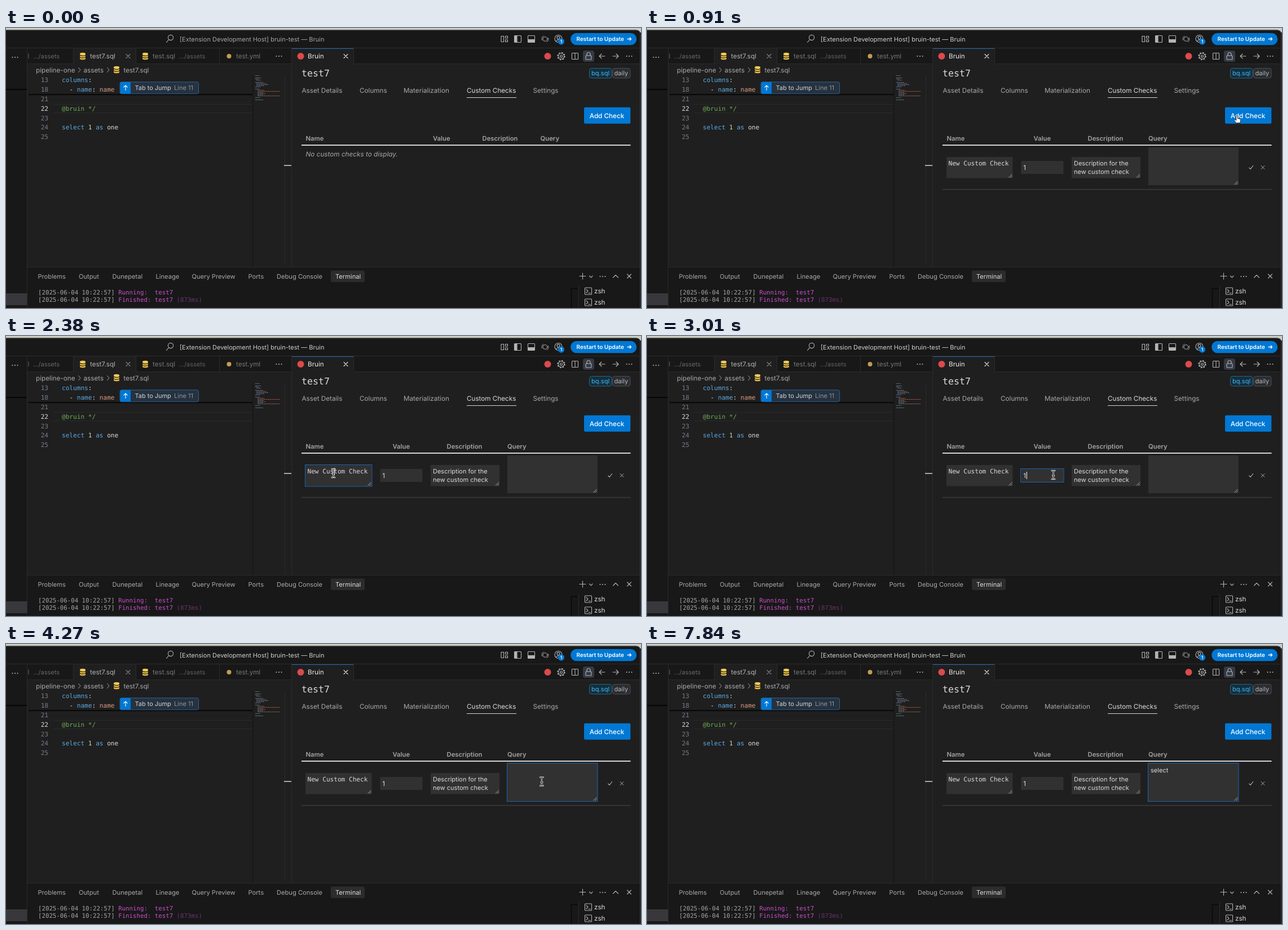
Recreate the animation shown at these times as an HTML page. Size 1126x497 px, loop 8000 ms.

```html
<!DOCTYPE html>
<html lang="en">
<head>
<meta charset="utf-8">
<title>Custom checks</title>
<style>
html, body { margin: 0; width: 100%; height: 100%; overflow: hidden; background: #181818; }
svg { display: block; width: 100vw; height: 100vh; }
text { font: 11.7px Inter, sans-serif; fill: #a9a9a9; white-space: pre; text-rendering: geometricPrecision; }
.mono text, text.mono { font: 11.1px "DejaVu Sans Mono", monospace; fill: #dadada; }
.num text { fill: #757c85; text-anchor: end; }
.term text { font-size: 10.74px; fill: #a6a6a6; }
.panel text { font-size: 11.15px; }
.head text { font-size: 11.3px; font-weight: 600; fill: #a4a4a4; }
.small { font-size: 11px; }
.icon { fill: none; stroke: #b4b4b4; stroke-width: 1.1; stroke-linecap: round; stroke-linejoin: round; }
.field { fill: #313131; }
.focus { fill: none; stroke: #1d62b4; }
.caret { fill: #f0f0f0; }
.key { fill: #5ba9e2; }
.light { fill: #dcdcdc !important; }
#title { font-size: 11.02px; }
</style>
</head>
<body>
<svg viewBox="0 0 1126 497" preserveAspectRatio="none">
  <defs>
    <g id="db">
      <path d="M-5 -4.200V4.200A5 2.100 0 0 0 5 4.200V-4.200Z" fill="#e8bd45"/>
      <ellipse cy="-4.200" rx="5" ry="2.100" fill="#f2cc58"/>
      <path d="M-5 -2.600A5 2.100 0 0 0 5 -2.600M-5 1.100A5 2.100 0 0 0 5 1.100" fill="none" stroke="#1f1f1f" stroke-width="1.200"/>
    </g>
    <g id="dots" fill="#b8b8b8"><circle cx="-4.500" r="1"/><circle r="1"/><circle cx="4.500" r="1"/></g>
    <path id="cross" d="M-3.500 -3.500L3.500 3.500M3.500 -3.500L-3.500 3.500"/>
    <path id="grip" d="M-6 0L0 -6M-2.800 0L0 -2.800" fill="none" stroke="#b5b5b5" stroke-width=".9"/>
    <g id="shell" class="icon"><rect x="-6" y="-6" width="12" height="12" rx="1"/><path d="M-3.500 -3L-.5 0L-3.500 3M.5 3.500H3.800"/></g>
  </defs>

  <!-- window -->
  <rect width="1126" height="8" fill="#c9cec4"/>
  <path d="M0 3.500H1117Q1125 3.500 1125 11V497H0Z" fill="#181818"/>
  <path d="M0 4H1117Q1124.500 4 1124.500 11V497" fill="none" stroke="#3d3d3d"/>
  <path d="M38 64H506V424H38ZM507 36H616V64H1124V424H507ZM120 36H230V64H120Z" fill="#1f1f1f"/>
  <path d="M0 35.500H1124M37.500 36V497M38 63.500H120M230 63.500H506M616 63.500H1124M119.500 36V64M230.500 36V64M378.500 36V64M506.500 36V424M616.500 36V64M38 424.500H1124" fill="none" stroke="#2b2b2b"/>
  <path d="M507 36.500H616" stroke="#2467ad"/>
  <rect y="108" width="37" height="2" fill="#050505"/>
  <rect y="471" width="37" height="21" fill="#38383c"/>
  <use href="#dots" x="16" y="52"/>

  <!-- title bar -->
  <g class="icon"><circle cx="292" cy="17" r="4.600"/><path d="M288.700 20.500L284.500 25.500"/></g>
  <text id="title" x="308" y="23.500">[Extension Development Host] bruin-test — Bruin</text>
  <g class="icon">
    <path d="M878 14.500H882.500V24.500H878ZM885.500 14.500H889.500V18H885.500ZM885.500 21H889.500V24.500H885.500Z"/>
    <rect x="901.500" y="13.500" width="12" height="12" rx="1"/><path d="M902 14H906V25H902Z" fill="#b4b4b4"/>
    <rect x="925.500" y="13.500" width="12" height="12" rx="1"/><path d="M926 20.500H937V25H926Z" fill="#b4b4b4"/>
    <g stroke-width=".9"><circle cx="956" cy="19.500" r="4"/><path d="M950.500 21.500A6 6 0 0 1 953 14.300M961.500 17.500A6 6 0 0 1 959 24.700"/></g>
    <circle cx="979.500" cy="19" r="6.500"/><circle cx="979.500" cy="17.300" r="2.400"/><path d="M975.500 23.500Q979.500 18 983.500 23.500"/>
  </g>
  <circle cx="984.500" cy="24" r="5.700" fill="#0078d4"/>
  <text x="984.500" y="27.200" text-anchor="middle" style="font-size:8.500px;font-weight:600;fill:#fff">1</text>
  <rect x="1001.200" y="9" width="117" height="21.300" rx="10.600" fill="#0078d4"/>
  <text x="1011.500" y="23.200" style="font-size:10px;font-weight:600;fill:#fff">Restart to Update</text>
  <path d="M1101.500 19.500H1108.500M1105.800 16.800L1108.500 19.500L1105.800 22.200" fill="none" stroke="#fff" stroke-width="1.300"/>

  <!-- editor tabs -->
  <g style="opacity:.55"><text x="38.500" y="54.300">l</text><text x="48" y="54.300" class="small">.../assets</text></g>
  <use href="#db" x="136" y="50"/>
  <text x="149" y="54.300" style="font-size:11.600px;fill:#b4b4b4">test7.sql</text>
  <use href="#cross" x="216.500" y="50" class="icon" style="stroke:#858585"/>
  <use href="#db" x="247" y="50"/>
  <g style="opacity:.65"><text x="260" y="54.300">test.sql</text><text x="306.500" y="54.300" class="small" opacity=".75">.../assets</text></g>
  <circle cx="395.500" cy="50" r="4" fill="#c59a55"/>
  <text x="408" y="54.300" style="font-size:11.600px" opacity=".65">test.yml</text>
  <use href="#dots" x="484" y="50"/>
  <circle cx="522.500" cy="50" r="6" fill="#dc4a4c"/>
  <text x="535" y="54.300" style="fill:#ececec">Bruin</text>
  <use href="#cross" x="602.500" y="50" class="icon" style="stroke:#e0e0e0"/>
  <circle cx="960.500" cy="50" r="6" fill="#dc4a4c"/>
  <rect x="1023" y="40" width="20" height="20" rx="4" fill="#343a45"/>
  <g class="icon">
    <circle cx="984.500" cy="50" r="5.200"/><circle cx="984.500" cy="50" r="2"/>
    <circle cx="984.500" cy="50" r="6.300" stroke-width="1.800" stroke-dasharray="2.200 2.748" stroke-linecap="butt"/>
    <rect x="1003.500" y="44.500" width="11" height="11" rx="1"/><path d="M1009 45V55"/>
    <rect x="1028" y="49" width="10" height="7" rx="1"/><path d="M1030 49V46.500A3 3 0 0 1 1036 46.500V49"/>
    <path d="M1062 50H1052M1056 46L1052 50L1056 54M1076 50H1086M1082 46L1086 50L1082 54"/>
  </g>
  <use href="#dots" x="1105" y="50"/>

  <!-- breadcrumb -->
  <text x="53" y="78.500">pipeline-one</text><text x="137.500" y="78.500">assets</text><text x="208.500" y="78.500" style="font-size:11.600px">test7.sql</text>
  <path class="icon" d="M128.500 70.500L132 74.500L128.500 78.500M179.500 70.500L183 74.500L179.500 78.500" style="stroke:#858585"/>
  <use href="#db" x="196" y="74"/>

  <!-- code -->
  <rect x="40" y="117" width="398" height="2.200" fill="#090909"/>
  <path d="M83 135.500H437M83 150.500H437" stroke="#2a2a2a"/>
  <path d="M437.500 84V424" stroke="#161616" stroke-width="1.500"/>
  <path d="M494.500 85V422" stroke="#2a2a2a"/>
  <rect x="493" y="243" width="13" height="2" fill="#a8a8a8"/>
  <g class="mono num">
    <text x="75" y="96">13</text><text x="75" y="112.800">18</text><text x="75" y="130.300">21</text>
    <text x="75" y="147" class="light">22</text><text x="75" y="163.500">23</text><text x="75" y="180.200">24</text><text x="75" y="196.800">25</text>
  </g>
  <g class="mono">
    <text x="99" y="96"><tspan class="key">columns</tspan>:</text>
    <text x="112.400" y="112.800">- <tspan class="key">name</tspan>: <tspan fill="#d89a7f">name</tspan></text>
    <text x="99" y="147" style="fill:#6cab56">@bruin */</text>
    <text x="99" y="180.200"><tspan class="key">select</tspan> <tspan fill="#c2dab4">1</tspan> <tspan class="key">as</tspan> one</text>
  </g>
  <g id="minimap" opacity=".75"></g>
  <rect x="202" y="95.800" width="139.500" height="21" rx="3" fill="#26323f" stroke="#2b629b"/>
  <path d="M221 96V116.500H205Q202.500 116.500 202.500 114V98.500Q202.500 96 205 96Z" fill="#0078d4"/>
  <path class="icon" d="M212 110.500V102M208.800 105.200L212 102L215.200 105.200" style="stroke:#fff"/>
  <text x="228.500" y="110.300" style="font-size:10.950px;fill:#d4d4d4">Tab to Jump</text>
  <text x="298" y="110.300" style="font-size:11.100px;fill:#8c949c">Line 11</text>

  <!-- asset view -->
  <text class="mono" x="524" y="85.700" style="font-size:16.600px">test7</text>
  <rect x="1034.500" y="71.500" width="39.500" height="17.500" rx="4" fill="#10303f" stroke="#33627c"/>
  <text x="1038" y="84.300" style="font-size:11.100px;fill:#4db3ee">bq.sql</text>
  <rect x="1075.500" y="71.500" width="31.500" height="17.500" rx="4" fill="#2a2d31" stroke="#4b4f54"/>
  <text x="1078.500" y="84.300" style="font-size:11.100px;fill:#b8b8b8">daily</text>
  <text x="524.500" y="114.600">Asset Details</text><text x="627" y="114.600">Columns</text><text x="705" y="114.600">Materialization</text>
  <text x="817" y="114.600" class="light">Custom Checks</text><text x="934.500" y="114.600">Settings</text>
  <path d="M817 123.500H905" stroke="#d6d6d6"/>
  <rect x="1025" y="140.800" width="82.300" height="29" rx="2" fill="#0078d4"/>
  <text x="1034.700" y="159.600" style="font-weight:500;fill:#fff">Add Check</text>
  <rect x="524" y="207" width="583.500" height="1.800" fill="#e8e8e8"/>
  <g class="head"><text x="531.500" y="200">Name</text></g>
  <g id="empty">
    <g class="head"><text x="757" y="200">Value</text><text x="844.500" y="200">Description</text><text x="947.500" y="200">Query</text></g>
    <text x="531.500" y="227.800" style="font-size:11.740px;font-style:italic">No custom checks to display.</text>
  </g>
  <g id="row">
    <g class="head"><text x="685.500" y="200">Value</text><text x="781.500" y="200">Description</text><text x="889" y="200">Query</text></g>
    <rect x="524" y="285.800" width="583.500" height="1.600" fill="#3a3a3a"/>
    <rect class="field" x="531" y="229" width="117.500" height="37.500"/>
    <rect class="field" x="663.500" y="236" width="75" height="23"/>
    <rect class="field" x="753" y="229" width="122" height="37.500"/>
    <rect class="field" x="889" y="212" width="160" height="67"/>
    <use href="#grip" x="647.500" y="265.500"/><use href="#grip" x="874" y="265.500"/><use href="#grip" x="1047.500" y="278"/>
    <text class="mono" x="534.500" y="244">New Custom Check</text>
    <text class="light" x="667.200" y="251.500">1</text>
    <text class="small light" x="757" y="244.300">Description for the</text>
    <text class="small light" x="757" y="259.300">new custom check</text>
    <text id="query" class="light" x="893" y="227.800" style="font-size:11.050px"></text>
    <path class="icon" d="M1067.800 248L1070 250.300L1074.700 244.500"/>
    <use href="#cross" transform="translate(1092 247.500) scale(.85)" class="icon"/>
    <rect id="nameFocus" class="focus" x="530.500" y="228.500" width="118.500" height="38.500"/>
    <rect id="valueFocus" class="focus" x="662.500" y="235.500" width="76.500" height="24"/>
    <rect id="queryFocus" class="focus" x="888.500" y="211.500" width="160.500" height="68"/>
    <rect id="caret" class="caret" width="1.100" height="13"/>
  </g>

  <!-- panel -->
  <rect x="576" y="430.500" width="60" height="20.500" rx="3" fill="#2c2c2c"/>
  <g class="panel">
    <text x="56.500" y="444.800">Problems</text><text x="129" y="444.800">Output</text><text x="188.500" y="444.800">Dunepetal</text>
    <text x="265.500" y="444.800">Lineage</text><text x="329.500" y="444.800">Query Preview</text><text x="429.500" y="444.800">Ports</text>
    <text x="480" y="444.800">Debug Console</text><text x="584" y="444.800" class="light">Terminal</text>
  </g>
  <g class="icon">
    <path d="M1017 440.500H1028M1022.500 435V446M1034.500 440L1037.300 442.800L1040 440M1076.500 443L1081 438.500L1085.500 443"/>
    <use href="#cross" x="1105" y="440.500"/>
  </g>
  <use href="#dots" x="1058" y="441"/>
  <g class="mono term">
    <text x="57" y="473">[2025-06-04 10:22:57] <tspan fill="#c94fcb">Running:  test7</tspan></text>
    <text x="57" y="486">[2025-06-04 10:22:57] <tspan fill="#c94fcb">Finished: test7</tspan> <tspan fill="#6c326e">(873ms)</tspan></text>
  </g>
  <path d="M1002.500 497V462.500H1014" fill="none" stroke="#080808" stroke-width="1.500"/>
  <path d="M1015.500 458V497" stroke="#2b2b2b"/>
  <use href="#shell" x="1032.500" y="467"/><text x="1043" y="471.200" class="light">zsh</text>
  <use href="#shell" x="1032.500" y="487"/><text x="1043" y="491.200" class="light">zsh</text>

  <!-- pointer -->
  <g id="ring" fill="none"><circle id="outer" stroke="#b0b0b0" stroke-width="1.200"/><circle id="inner" stroke="#858585"/></g>
  <g id="pointer">
    <path id="arrow" d="M0 0V14L3.300 11L5.500 16L8 15L5.800 10H10Z" fill="#111" stroke="#fff"/>
    <path id="hand" d="M-1.300 1.200Q0 -.6 1.300 1.200V5.500L6 6.500Q7 7 6.800 9L5.800 13.500H-1.500L-5 8.500Q-4.500 6.500 -1.300 9Z" fill="#fff" stroke="#222"/>
    <g id="beam" fill="none" stroke-linecap="round"></g>
  </g>
</svg>
<script>
const $ = id => document.getElementById(id);
const LOOP = 8000, STEP = 70, ADDED = 910;

// minimap: [y, x, width, colour]
const GREEN = '#6a9955', BLUE = '#569cd6', ORANGE = '#b9694e';
$('minimap').innerHTML = [
  [84, 442, 8, GREEN], [88, 442, 10, BLUE], [90, 442, 6, ORANGE], [92, 444, 8, BLUE],
  [96, 442, 14, BLUE], [98, 444, 18, ORANGE], [100, 444, 21, BLUE], [102, 444, 14, ORANGE],
  [104, 442, 9, BLUE], [108, 442, 8, BLUE], [110, 446, 12, ORANGE], [112, 446, 40, ORANGE],
  [114, 446, 11, BLUE], [116, 446, 14, ORANGE], [118, 446, 10, BLUE], [120, 446, 39, ORANGE],
  [123, 442, 9, GREEN], [127, 442, 14, BLUE]
].map(([y, x, w, c]) =>
  `<path d="M${x} ${y + .5}h${w}" stroke="${c}" stroke-width="1.1" stroke-dasharray="3 .6"/>`).join('');

const beam = 'M-2.700-7.500Q0-7.500 0-5.500V5.500Q0 7.500-2.700 7.500M2.700-7.500Q0-7.500 0-5.500M2.700 7.500Q0 7.500 0 5.500M-1.500 1.500H1.500';
$('beam').innerHTML = `<path d="${beam}" stroke="#f0f0f0" stroke-width="2.400"/><path d="${beam}" stroke="#222"/>`;

// pointer path: [time, x, y]
const path = [
  [280, 1104, 298], [700, 1046, 155], [980, 1046, 155], [1050, 808, 177], [1260, 559.5, 262],
  [1330, 559.5, 262], [1470, 580.5, 243.5], [2380, 580.5, 243.5], [2800, 720.5, 246.5],
  [3150, 720.5, 246.5], [3570, 950, 244]
];
// clicks: [start, end, final radius]
const clicks = [[700, ADDED, 29], [2170, 2310, 26], [2940, 3010, 23], [3710, 3780, 29]];
const typed = [[5040, 's'], [5250, 'se'], [5460, 'sel'], [5530, 'sele'], [5740, 'selec'], [5950, 'select'], [7350, 'select\u00a0']];
// visible carets: [from, to, field]
const carets = [
  [2170, 2660, 'name'], [2940, 3430, 'value'], [3710, 4270, 'query'], [4830, 6440, 'query'], [7000, 7840, 'query']
];
const spots = { name: [581.5, 234], value: [672.8, 241], query: [892.8, 217] };

const within = (t, a, b) => t >= a && t < b;
const show = (id, on) => { $(id).style.display = on ? '' : 'none'; };
const ease = p => p * p * (3 - 2 * p);

function pointAt(t) {
  const i = path.findIndex(k => k[0] > t);
  if (i < 0) return path.at(-1).slice(1);
  if (i === 0) return path[0].slice(1);
  const [t0, x0, y0] = path[i - 1], [t1, x1, y1] = path[i];
  const p = ease((t - t0) / (t1 - t0));
  return [x0 + (x1 - x0) * p, y0 + (y1 - y0) * p];
}

function kindAt(t, x, y) {
  if (x > 1024 && y > 140 && y < 170) return 'hand';
  const fields = t >= ADDED && y > 212 && (x < 649 || within(x, 663, 739) || within(x, 753, 875) || x > 889);
  return fields ? 'beam' : 'arrow';
}

function draw(t) {
  const added = t >= ADDED;
  show('empty', !added);
  show('row', added);
  $('title').style.fill = added ? '#cfcfcf' : '#a6a6a6'; // the click activates the window
  show('nameFocus', within(t, 2170, 2940));
  show('valueFocus', within(t, 2940, 3710));
  show('queryFocus', t >= 3710);

  const word = typed.filter(k => k[0] <= t).at(-1);
  $('query').textContent = word ? word[1] : '';

  const blink = carets.find(([a, b]) => within(t, a, b));
  show('caret', blink);
  if (blink) {
    const [x, y] = spots[blink[2]];
    $('caret').setAttribute('x', blink[2] === 'query' && word ? x + $('query').getComputedTextLength() : x);
    $('caret').setAttribute('y', y);
  }

  const [x, y] = pointAt(t), kind = kindAt(t, x, y);
  show('pointer', within(t, 280, 5110));
  for (const k of ['arrow', 'hand', 'beam']) show(k, k === kind);
  $('pointer').setAttribute('transform', `translate(${x} ${y})`);

  const click = clicks.find(([a, b]) => within(t, a, b));
  show('ring', click);
  if (click) {
    const r = click[2] * Math.min(1, .6 + .4 * (t - click[0]) / 140);
    $('ring').setAttribute('transform', `translate(${x} ${y})`);
    $('outer').setAttribute('r', r);
    $('inner').setAttribute('r', r - 2.4);
  }
}

const start = performance.now();
function tick() {
  const t = (performance.now() - start) % LOOP;
  draw(Math.floor(t / STEP) * STEP);
  requestAnimationFrame(tick);
}
draw(0);
requestAnimationFrame(tick);
</script>
</body>
</html>
```
